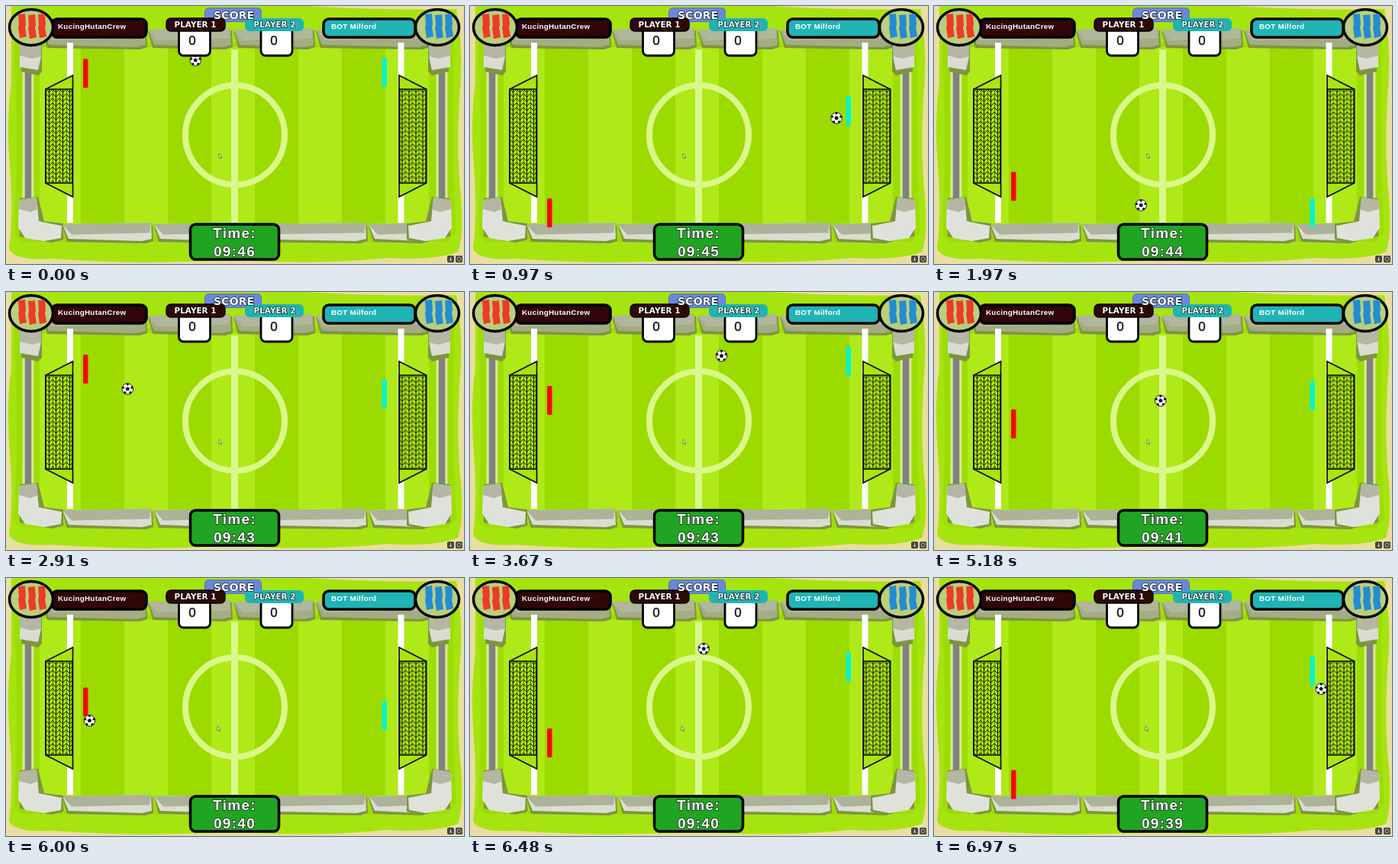
Recreate the animation shown at these times as an HTML page. Size 600x338 px, loop 7 s.

```html
<!DOCTYPE html>
<html lang="en">
<head>
<meta charset="utf-8">
<title>Paddle football</title>
<style>
html, body { margin: 0; width: 100%; height: 100%; overflow: hidden; background: #e8dda3 }
svg { display: block; width: 100vw; height: 100vh }
text { fill: #fff; font-family: "Liberation Sans", Arial, sans-serif }
.mid { text-anchor: middle }
.wide { font: bold 10.4px "DejaVu Sans", sans-serif; paint-order: stroke; stroke: #000; stroke-width: 1.2px }
.name { font-size: 9.8px; font-weight: bold; letter-spacing: .3px }
.clock { font-size: 19px; font-weight: bold; letter-spacing: 1.3px; paint-order: stroke; stroke: #222; stroke-width: 1.5px }
.line { fill: none; stroke: #daf88a }
.box { stroke: #000; stroke-width: 3.5px }
</style>
</head>
<body>
<svg viewBox="0 0 600 338" preserveAspectRatio="none">
  <defs>
    <pattern id="net" width="9" height="6" patternUnits="userSpaceOnUse" x="52" y="109">
      <path d="M0 0L4.500 4L9 0M0 6L4.500 10L9 6M0-6L4.500-2L9-6M0 0V6M4.500 0V6" fill="none" stroke="#111"/>
    </pattern>
    <g id="goal" stroke="#111" stroke-width="1.700">
      <path d="M52 109L87.500 91V250L52 232Z" fill="#aae510"/>
      <path d="M52 109H87V232H52Z" fill="url(#net)"/>
    </g>
    <g id="side">
      <path d="M29 80V256" stroke="#d5ea8c" stroke-width="15"/>
      <path d="M29 80V256" stroke="#808080" stroke-width="8.500"/>
      <path d="M18 42H47V86L42 91L20 86Z" fill="#7f9440"/>
      <path d="M18 40L46 38V66L42 84L18 80Z" fill="#d9dcd1"/>
      <path d="M18 40L46 38V66L34 69L18 65Z" fill="#b3b7a4"/>
      <path d="M18 252L42 250L47 270L50 282L75 285V306L60 310L18 302Z" fill="#7f9440"/>
      <path d="M17 254L40 251L43 282L73 288L72 304L50 308L25 304L16 290Z" fill="#dfe2da"/>
      <path d="M17 254L40 251L42 266L32 270L17 266Z" fill="#b3b7a4"/>
    </g>
  </defs>

  <path d="M7 0H390Q490 6 590 4Q600 60 594 120Q590 200 596 250Q600 300 592 322Q560 334 500 330Q400 340 300 332Q180 340 60 331Q10 334 4 318Q10 270 5 210Q0 150 7 100Z" fill="#a6e40f"/>
  <path d="M10 48Q17 170 11 300L20 309H580L590 296Q582 170 588 46Z" fill="#9ddd05"/>
  <g id="turf"></g>
  <g id="walls"></g>
  <use href="#side"/>
  <use href="#side" transform="matrix(-1 0 0 1 600 0)"/>
  <path d="M84 48V284M517.500 48V284" stroke="#fff" stroke-width="8"/>
  <path class="line" d="M299.500 57V284" stroke-width="9"/>
  <circle class="line" cx="300" cy="169" r="65" stroke-width="8"/>
  <use href="#goal"/>
  <use href="#goal" transform="matrix(-1 0 0 1 602.500 0)"/>

  <rect id="red" x="101" width="6.500" height="38" rx="1.500" fill="#f80808"/>
  <rect id="cyan" x="492.500" width="6.500" height="38" rx="1.500" fill="#08f4d0"/>
  <g id="ball">
    <circle r="7.300" fill="#fff" stroke="#222"/>
    <g id="spots"></g>
  </g>

  <rect class="box" x="60" y="17" width="124" height="24" rx="7" fill="#300606"/>
  <rect class="box" x="416" y="17" width="120" height="24" rx="7" fill="#20b4b4"/>
  <text class="name" x="68" y="29.500">KucingHutanCrew</text>
  <text class="name" x="426" y="30">BOT Milford</text>
  <g id="badges"></g>

  <g fill="#fff" stroke="#000" stroke-width="2.800">
    <rect x="226.500" y="28" width="41" height="37" rx="6"/>
    <rect x="334" y="28" width="41" height="37" rx="6"/>
  </g>
  <g class="mid" font-size="17" stroke="#111" stroke-width=".4">
    <text x="244" y="50.500" style="fill:#111">0</text>
    <text x="351" y="50.500" style="fill:#111">0</text>
  </g>
  <rect x="260.500" y="2.500" width="74" height="18" rx="5" fill="#6988d8" stroke="#5870c0"/>
  <rect x="210" y="16" width="77" height="17" rx="6" fill="#300808" stroke="#000" stroke-width="1.500"/>
  <rect x="313" y="16" width="77" height="17" rx="6" fill="#20b4b4"/>
  <text class="wide mid" x="298.500" y="17" style="font-size:14.300px">SCORE</text>
  <text class="wide mid" x="248" y="28">PLAYER 1</text>
  <text class="wide mid" x="352" y="27.500">PLAYER 2</text>

  <rect class="box" x="241.500" y="286" width="116" height="46" rx="7" fill="#20a522"/>
  <text class="clock mid" x="299.500" y="304">Time:</text>
  <text class="clock mid" x="299.500" y="327.500" id="time"></text>
  <path id="cursor" d="M0-3V3L1.500 2L2.500 4L3.300 3.500L2.500 1.600H4Z" fill="#eee" stroke="#444" stroke-width=".6"/>
  <g fill="#444">
    <rect x="578" y="327" width="9" height="9" rx="2"/>
    <rect x="589" y="327" width="9" height="9" rx="2"/>
    <path d="M582.500 329V333M580.800 333H584.200" stroke="#ddd"/>
    <circle cx="593.500" cy="331.500" r="2.500" fill="none" stroke="#bbb"/>
  </g>
</svg>
<script>
const $ = id => document.getElementById(id);
const fill = (id, parts) => $(id).innerHTML = parts.join('');
const poly = (points, color) => `<polygon points="${points}" fill="${color}"/>`;
const clamp = (v, min, max) => Math.min(max, Math.max(min, v));

const STRIPE = 57;
fill('turf', [...Array(10).keys()].map(i => {
  const x = clamp(i * STRIPE - 16, 44, 556), end = clamp(i * STRIPE + 41, 44, 556);
  return `<rect x="${x}" y="54" width="${end - x}" height="231" fill="${i % 2 ? '#afe918' : '#9bdb00'}"/>`;
}));

// A stone slab: shadow, front and top face
const slab = (x, end, y, h, top, front) =>
  poly([x, y + 4, end, y + 3, end + 1, y + h, end - 9, y + h + 3, x + 6, y + h + 1], '#7f9440') +
  poly([x, y + 2, end - 2, y, end - 1, y + h - 3, end - 14, y + h, x + 8, y + h - 3], front) +
  poly([x, y + 2, end - 2, y, end - 4, y + h * .55, x + 12, y + h * .65], top);
const row = (edges, ...look) => edges.slice(1).map((end, i) => slab(edges[i], end - 2, ...look));
fill('walls', [
  ...row([48, 186, 298, 406, 556], 29, 25, '#b0b79a', '#a3ac84'),
  ...row([74, 194, 300, 475, 556], 284, 24, '#adb29b', '#daddd0')
]);

const badge = (cx, barX, color) =>
  `<ellipse cx="${cx}" cy="28" rx="28.500" ry="23.500" fill="#b9cf7c" stroke="#000" stroke-width="3.500"/>` +
  [-13, 0, 13].map((dx, i) =>
    `<path d="M${barX + dx - 5} ${11 + i % 2}l9-1 1 14-1 3 2 13-9 2-2-14 1-3Z" fill="${color}"/>`).join('');
fill('badges', [badge(33, 34, '#ed3b24'), badge(565, 567, '#258bd2')]);

const pentagon = (r, turn, cx = 0, cy = 0) => [0, 1, 2, 3, 4].map(k => {
  const a = (k * 72 + turn) * Math.PI / 180;
  return [cx + r * Math.sin(a), cy - r * Math.cos(a)];
});
fill('spots', [
  poly(pentagon(2.8, 0), '#111'),
  ...pentagon(6, 0).map(([x, y], k) => poly(pentagon(1.8, k * 72 + 180, x, y), '#111'))
]);

const LOOP = 7000, CEILING = 71, FLOOR = 281, BOT_DELAY = 120;

// Each kick: time, x, y, and speed per second in x and y
const kicks = [
  [0, 248, 71, 239, 78],
  [990, 485, 148, -218, 156],
  [2700, 112, 139, 224, -57],
  [4360, 484, 98, -228, 54],
  [6000, 109, 187, 410, -196]
];
// Where the player stops or turns: time, y
const playerMoves = [[0, 88], [970, 271], [1970, 236.5], [2910, 101], [4420, 182.5], [6000, 162.5], [6970, 270.5], [LOOP, 271]];

// Reflects a straight path between ceiling and floor
function bounce(y) {
  const span = FLOOR - CEILING, turn = 2 * span;
  const d = ((y - CEILING) % turn + turn) % turn;
  return CEILING + Math.min(d, turn - d);
}

function ballAt(t) {
  const [start, x, y, vx, vy] = kicks.findLast(k => k[0] <= t);
  const s = (t - start) / 1000;
  return [x + vx * s, bounce(y + vy * s)];
}

function playerAt(t) {
  const i = playerMoves.findIndex(m => m[0] > t);
  const [t0, y0] = playerMoves[i - 1], [t1, y1] = playerMoves[i];
  return y0 + (y1 - y0) * (t - t0) / (t1 - t0);
}

const botAt = t => clamp(ballAt(Math.max(0, t - BOT_DELAY))[1], 87, 271);

function draw(t) {
  $('ball').setAttribute('transform', `translate(${ballAt(t)})`);
  $('red').setAttribute('y', playerAt(t) - 19);
  $('cyan').setAttribute('y', botAt(t) - 19);
  $('cursor').setAttribute('transform', t < 5200 ? 'translate(279 196)' : 'translate(277 197)');
  $('time').textContent = '09:' + (46 - Math.floor((t + 300) / 1000));
}

const start = performance.now();
function frame() {
  draw((performance.now() - start) % LOOP);
  requestAnimationFrame(frame);
}
frame();
</script>
</body>
</html>
```
